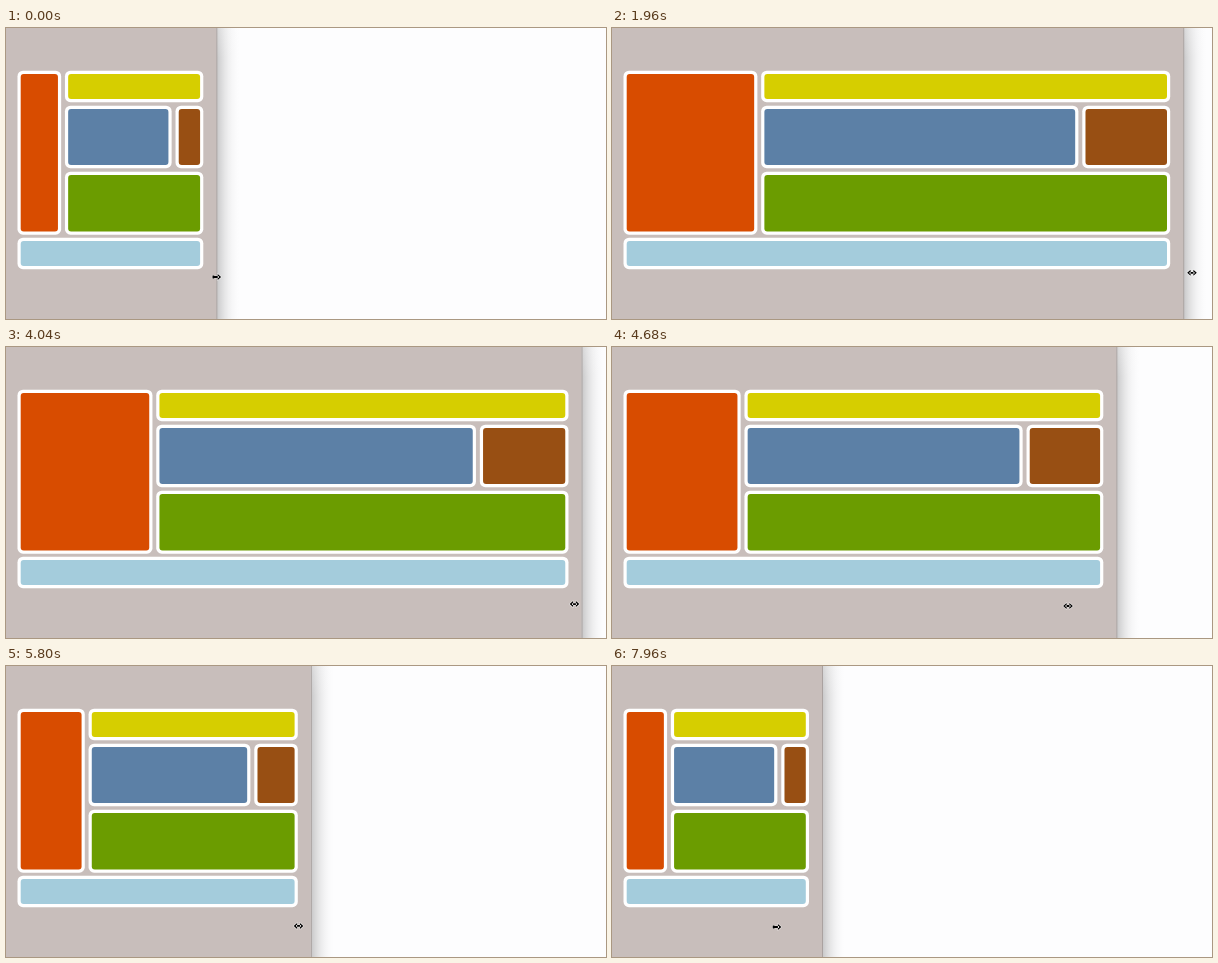
Animation of 600 by 291 pixels, one loop 8 s. Source, as an HTML page with a canvas:

```html
<!DOCTYPE html>
<html lang="en">
<head>
<meta charset="utf-8">
<title>Fluid layout</title>
<style>
  html, body { margin: 0; width: 100%; height: 100%; overflow: hidden; background: #fdfdfe; }
  canvas { display: block; width: 600px; height: 291px; }
</style>
</head>
<body>
<canvas id="stage"></canvas>
<script>
const WIDTH = 600, HEIGHT = 291, LOOP = 8000, STEP = 40;
const MIN_EDGE = 210;
const LAG = 150; // the window edge trails the pointer by this many ms
const BORDER = 3.2, SHADOW = 24;

const canvas = document.getElementById('stage');
const ctx = canvas.getContext('2d');
const ratio = window.devicePixelRatio || 1;
canvas.width = WIDTH * ratio;
canvas.height = HEIGHT * ratio;
ctx.scale(ratio, ratio);

// Monotone cubic through [ms, value] points
function curve(points) {
  const last = points.length - 1;
  const slope = i => (points[i + 1][1] - points[i][1]) / (points[i + 1][0] - points[i][0]);
  const tangents = points.map((_, i) => {
    const a = slope(Math.max(0, i - 1)), b = slope(Math.min(last - 1, i));
    return a * b <= 0 ? 0 : 2 * a * b / (a + b);
  });
  return time => {
    let i = 0;
    while (i < last - 1 && time > points[i + 1][0]) i++;
    const [t0, v0] = points[i], [t1, v1] = points[i + 1];
    const h = t1 - t0, u = Math.min(1, Math.max(0, (time - t0) / h));
    return v0 + (v1 - v0) * u * u * (3 - 2 * u)
      + h * u * (1 - u) * ((1 - u) * tangents[i] - u * tangents[i + 1]);
  };
}

const pointerX = curve([
  [0, 210.3], [450, 212], [690, 247], [890, 292.2], [1040, 371], [1530, 534],
  [1810, 571.2], [1960, 580], [2750, 606], [4050, 568], [4530, 504.3],
  [4680, 456], [5650, 304.8], [6570, 247], [7960, 164.5]
]);
const pointerY = curve([[0, 249], [1200, 243], [4680, 259], [8000, 261]]);

function roundBox(x0, y0, x1, y1, radius, color) {
  ctx.fillStyle = color;
  ctx.beginPath();
  ctx.roundRect(x0, y0, x1 - x0, y1 - y0, radius);
  ctx.fill();
}

function panel(x0, y0, x1, y1, color) {
  roundBox(x0, y0, x1, y1, 5.5, '#fff');
  roundBox(x0 + BORDER, y0 + BORDER, x1 - BORDER, y1 - BORDER, 3, color);
}

function drawShadow(edge) {
  const fade = ctx.createLinearGradient(edge, 0, edge + SHADOW, 0);
  for (let u = 0; u <= 1; u += .125) {
    fade.addColorStop(u, `rgba(0,0,0,${.22 * (1 - u) ** 2})`);
  }
  ctx.fillStyle = fade;
  ctx.fillRect(edge, 0, SHADOW, HEIGHT);

  const top = ctx.createLinearGradient(0, 0, 0, 30);
  top.addColorStop(0, 'rgba(253,253,254,.25)');
  top.addColorStop(1, 'rgba(253,253,254,0)');
  ctx.fillStyle = top;
  ctx.fillRect(edge, 0, SHADOW, 30);
}

function drawWindow(edge) {
  drawShadow(edge);
  ctx.fillStyle = '#c8bebb';
  ctx.fillRect(0, 0, edge, HEIGHT);
  ctx.fillStyle = '#aaa2a0';
  ctx.fillRect(edge, 0, 1, HEIGHT);

  const left = 11.5, right = edge - 13, total = right - left;
  const column = left + total / 4, split = left + total * 5 / 6;
  panel(left, 42.7, column - 2.8, 206.7, '#d84c00');
  panel(column + 1, 42.7, right, 74.2, '#d6ce00');
  panel(column + 1, 77.7, split - .7, 140.2, '#5c80a6');
  panel(split + 3.2, 77.7, right, 140.2, '#984f13');
  panel(column + 1, 143.7, right, 206.7, '#6b9c00');
  panel(left, 209.7, right, 241.2, '#a4ccdc');
}

function arrowHead(direction) {
  ctx.moveTo(4.8 * direction, 0);
  ctx.lineTo(1.4 * direction, -3 * direction);
  ctx.lineTo(1.4 * direction, 3 * direction);
  ctx.closePath();
}

function drawPointer(x, y, growOnly) {
  ctx.save();
  ctx.translate(x, y);
  ctx.beginPath();
  ctx.rect(-2.5, -.9, 5, 1.8);
  arrowHead(1);
  if (growOnly) ctx.rect(-3.8, -1.4, 1.8, 2.8);
  else arrowHead(-1);
  ctx.strokeStyle = 'rgba(255,255,255,.5)';
  ctx.lineWidth = 1.4;
  ctx.lineJoin = 'round';
  ctx.stroke();
  ctx.fillStyle = '#000';
  ctx.fill();
  ctx.restore();
}

function draw(time) {
  const edge = Math.max(MIN_EDGE, pointerX(time - LAG));
  ctx.fillStyle = '#fdfdfe';
  ctx.fillRect(0, 0, WIDTH, HEIGHT);
  drawWindow(edge);
  drawPointer(pointerX(time), pointerY(time), edge < MIN_EDGE + .4);
}

const start = performance.now();
function frame() {
  const time = (performance.now() - start) % LOOP;
  draw(Math.floor(time / STEP) * STEP);
  requestAnimationFrame(frame);
}
frame();
</script>
</body>
</html>
```
